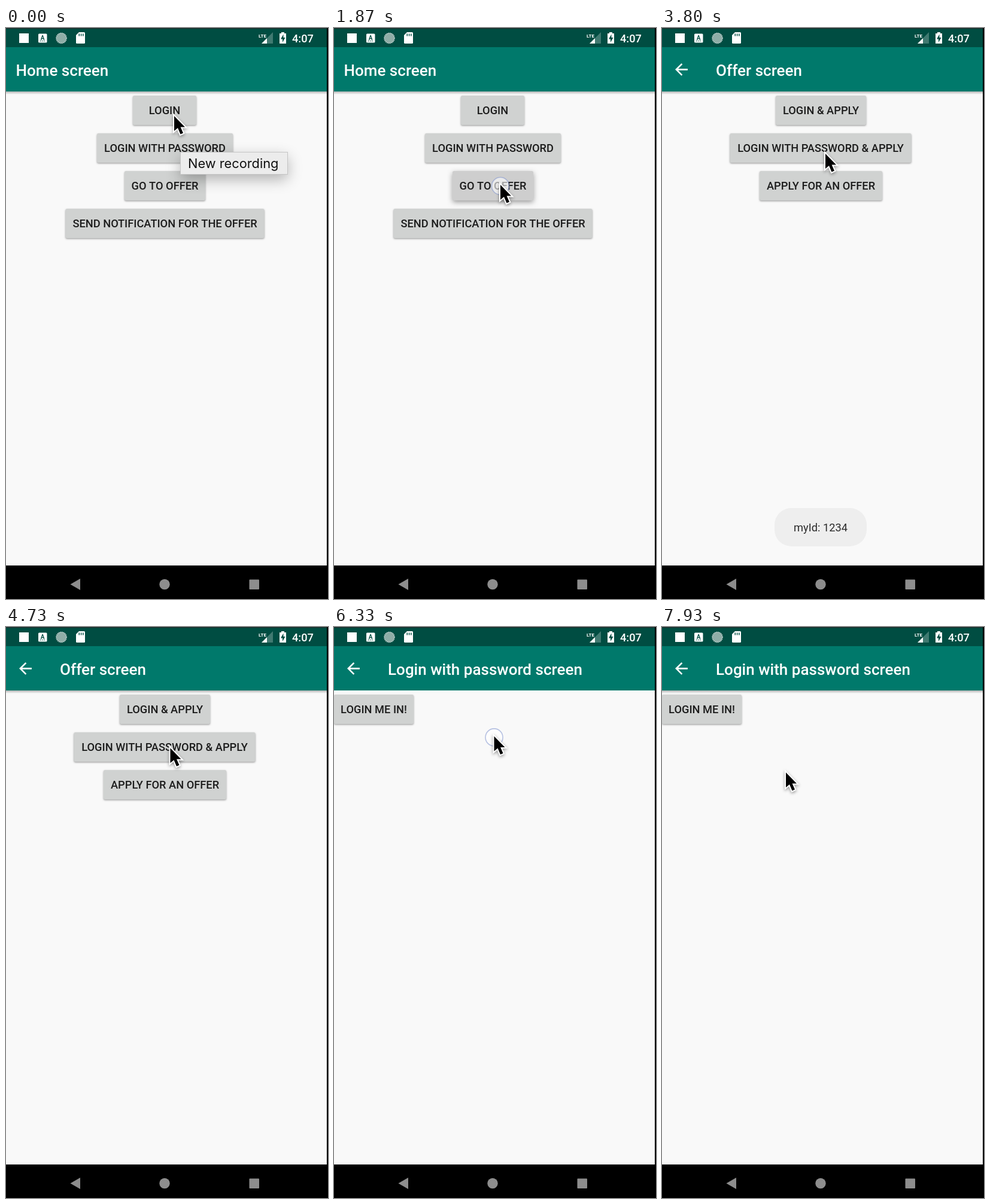
Animation of 538x954 px, one loop 8 s. Source, as an HTML page with a canvas:

```html
<!DOCTYPE html>
<html lang="en">
<head>
<meta charset="utf-8">
<title>App screens</title>
<style>
html, body { margin: 0; width: 100%; height: 100%; overflow: hidden; background: #000; }
canvas { display: block; }
</style>
</head>
<body>
<canvas id="stage" width="538" height="954"></canvas>
<script>
const ctx = document.getElementById('stage').getContext('2d');
const LOOP = 8000, WIDTH = 536;
const BUTTON_FONT = '500 18.25px Roboto, sans-serif';

// Buttons: label, left edge, width; each row is 63px below the last.
const screens = [
  { start: -1000, title: 'Home screen', buttons: [
    ['LOGIN', 212, 106], ['LOGIN WITH PASSWORD', 152, 227],
    ['GO TO OFFER', 198, 135], ['SEND NOTIFICATION FOR THE OFFER', 99.5, 332]] },
  { start: 1980, back: true, title: 'Offer screen', buttons: [
    ['LOGIN & APPLY', 190, 151], ['LOGIN WITH PASSWORD & APPLY', 113.5, 303],
    ['APPLY FOR AN OFFER', 163, 205]] },
  { start: 5950, back: true, title: 'Login with password screen', buttons: [
    ['LOGIN ME IN!', 0, 133]] }
];
const FADE = 130;

// Pointer tip: time, x, y
const pointerPath = [
  [0, 281, 147], [1000, 281, 147], [1550, 278, 262], [1950, 278, 262],
  [2250, 279, 293], [2700, 279, 293], [3100, 284, 337], [3750, 273, 210],
  [4500, 273, 210], [5600, 286, 142], [6000, 286, 142], [6600, 254, 212],
  [6820, 254, 212], [7400, 218, 245], [7800, 207, 243], [8000, 207, 243]
];
// Presses: from, to, screen, row
const presses = [
  { from: 1780, to: 1960, ringEnd: 2100, screen: 0, row: 2 },
  { from: 5780, to: 5950, ringEnd: 6880, screen: 1, row: 0 }
];

const arrow = new Path2D('M0 0V25L6 20L10.5 30.5L15 28.5L10.6 18.5H18Z');
const backIcon = new Path2D('M20 11H7.83l5.59-5.59L12 4l-8 8 8 8 1.41-1.41L7.83 13H20v-2z');
const sdCard = new Path2D('M122 7H130.500Q132 7 132 8.500V24.500Q132 26 130.500 26H118.500Q117 26 117 24.500V12Z');
const battery = new Path2D('M460 9V7H465V9H468V26H457V9Z');
const bolt = new Path2D('M463.500 10.500L459 18.500H462V24L466.500 16H463.500Z');

const ramp = (t, from, to) => Math.max(0, Math.min(1, (t - from) / (to - from)));
const ease = p => p * p * (3 - 2 * p);

function rect(x, y, w, h, color, radius = 0) {
  ctx.fillStyle = color;
  ctx.beginPath();
  ctx.roundRect(x, y, w, h, radius);
  ctx.fill();
}

function circle(x, y, r, color) {
  ctx.fillStyle = color;
  ctx.beginPath();
  ctx.arc(x, y, r, 0, 7);
  ctx.fill();
}

function poly(color, ...points) {
  ctx.fillStyle = color;
  ctx.beginPath();
  points.forEach(([x, y]) => ctx.lineTo(x, y));
  ctx.fill();
}

function text(label, x, y, font, color, align = 'left') {
  ctx.font = font;
  ctx.fillStyle = color;
  ctx.textAlign = align;
  ctx.fillText(label, x, y);
}

function fillPath(path, color) {
  ctx.fillStyle = color;
  ctx.fill(path);
}

function layer(alpha, draw) {
  if (alpha <= 0) return;
  ctx.save();
  ctx.globalAlpha = alpha;
  draw();
  ctx.restore();
}

function shadow(color, blur, y) {
  ctx.shadowColor = color;
  ctx.shadowBlur = blur;
  ctx.shadowOffsetY = y;
}

function drawStatusBar() {
  const dark = '#004d42';
  rect(0, 0, WIDTH, 32, dark);
  rect(0, 0, WIDTH, 1.5, '#1d302d');
  rect(22, 9, 16, 16, '#fff');
  rect(54, 9.5, 14.5, 15, '#fff', 1.5);
  text('A', 61.2, 19.5, 'bold 10px Roboto, sans-serif', dark, 'center');
  for (let x = 57; x < 66; x += 3) rect(x, 21, 1.5, 1.2, dark);

  circle(92.5, 17, 8.5, '#8fada7');
  ctx.strokeStyle = '#d5e0de';
  ctx.lineWidth = 1.5;
  ctx.setLineDash([1.5, 1.2]);
  ctx.beginPath();
  ctx.arc(92.5, 17, 8.5, 0, 7);
  ctx.stroke();
  ctx.setLineDash([]);

  fillPath(sdCard, '#fff');
  for (let x = 121.5; x < 130; x += 3.3) rect(x, 9.5, 1.5, 4, dark);

  text('LTE', 422, 15.5, 'bold 8px Roboto, sans-serif', '#fff');
  poly('#407a71', [427, 26], [446, 26], [446, 7]);
  poly('#fff', [427, 26], [436, 26], [436, 17]);
  fillPath(battery, '#fff');
  fillPath(bolt, dark);
  text('4:07', 478, 23.7, BUTTON_FONT, '#fff');
}

function drawNavBar() {
  rect(0, 898, 538, 56, '#000');
  poly('#8d8d8d', [107.500, 929.500], [124, 920], [124, 939]);
  circle(265, 929.5, 8.7, '#8d8d8d');
  rect(406.5, 921.5, 16.5, 16.5, '#8d8d8d', 1);
}

function drawScreen({ title, back, buttons }, pressedRow) {
  if (back) {
    ctx.save();
    ctx.translate(16.8, 53.7);
    ctx.scale(1.304, 1.304);
    fillPath(backIcon, '#fff');
    ctx.restore();
  }
  text(title, back ? 90 : 16.5, 79.5, '500 26px Roboto, sans-serif', '#fff');
  buttons.forEach(([label, x, w], row) => {
    const y = 113 + row * 63, pressed = row === pressedRow;
    ctx.save();
    shadow('rgba(0,0,0,.38)', pressed ? 9 : 3, pressed ? 3 : 1.3);
    rect(x, y, w, 49, pressed ? '#cecece' : '#d0d2d1', 2.5);
    ctx.restore();
    text(label, x + w / 2, y + 31.4, BUTTON_FONT, '#1c1c1c', 'center');
  });
}

function drawBarShadow() {
  const fade = ctx.createLinearGradient(0, 106, 0, 111);
  fade.addColorStop(0, 'rgba(0,0,0,.28)');
  fade.addColorStop(1, 'rgba(0,0,0,0)');
  rect(0, 106, WIDTH, 5, fade);
}

function drawToast() {
  rect(188, 802, 154, 64, '#eeeeee', 28);
  text('myId: 1234', 265, 841.3, '18.25px Roboto, sans-serif', '#2b2b2b', 'center');
}

function drawTooltip() {
  ctx.save();
  shadow('rgba(0,0,0,.3)', 24, 8);
  rect(292, 208, 178, 36.5, '#ececec');
  ctx.restore();
  ctx.strokeStyle = '#c4c4c4';
  ctx.lineWidth = 1;
  ctx.strokeRect(291.5, 207.5, 179, 37);
  text('New recording', 304, 234, '21.8px Inter, sans-serif', '#111');
}

function pointerAt(t) {
  const next = Math.max(1, pointerPath.findIndex(key => key[0] > t));
  const [t0, x0, y0] = pointerPath[next - 1], [t1, x1, y1] = pointerPath[next];
  const p = ease(ramp(t, t0, t1));
  return [x0 + (x1 - x0) * p, y0 + (y1 - y0) * p];
}

function drawPointer(x, y) {
  ctx.save();
  ctx.translate(x, y);
  ctx.strokeStyle = '#fff';
  ctx.lineWidth = 4;
  shadow('rgba(0,0,0,.4)', 5, 2);
  ctx.stroke(arrow);
  ctx.restore();
  ctx.save();
  ctx.translate(x, y);
  fillPath(arrow, '#000');
  ctx.restore();
}

function drawRing(x, y) {
  circle(x, y + 2, 14.5, 'rgba(255,255,255,.6)');
  ctx.strokeStyle = 'rgba(125,145,205,.55)';
  ctx.lineWidth = 1.6;
  ctx.stroke();
}

function draw(t) {
  rect(0, 0, 538, 954, '#000');
  ctx.save();
  ctx.beginPath();
  ctx.rect(0, 0, WIDTH, 898);
  ctx.clip();
  rect(0, 0, WIDTH, 898, '#f9f9f9');
  if (t < 6000 || t > 6860) drawBarShadow();
  rect(0, 32, WIDTH, 74, '#00796b');
  drawStatusBar();

  screens.forEach((screen, i) => {
    const next = screens[i + 1];
    const shown = ramp(t, screen.start, screen.start + FADE);
    const hidden = next ? ramp(t, next.start, next.start + FADE) : 0;
    const press = presses.find(p => p.screen === i && t >= p.from && t < p.to);
    layer(shown * (1 - hidden), () => drawScreen(screen, press?.row));
  });
  layer(ramp(t, 2140, 2390) * (1 - ramp(t, 4220, 4440)), drawToast);
  ctx.restore();
  drawNavBar();

  layer(1 - ramp(t, 400, 650), drawTooltip);
  const [x, y] = pointerAt(t);
  if (presses.some(p => t >= p.from && t < p.ringEnd)) drawRing(x, y);
  drawPointer(x, y);
}

const began = performance.now();
function tick() {
  draw((performance.now() - began) % LOOP);
  requestAnimationFrame(tick);
}
tick();
</script>
</body>
</html>
```
